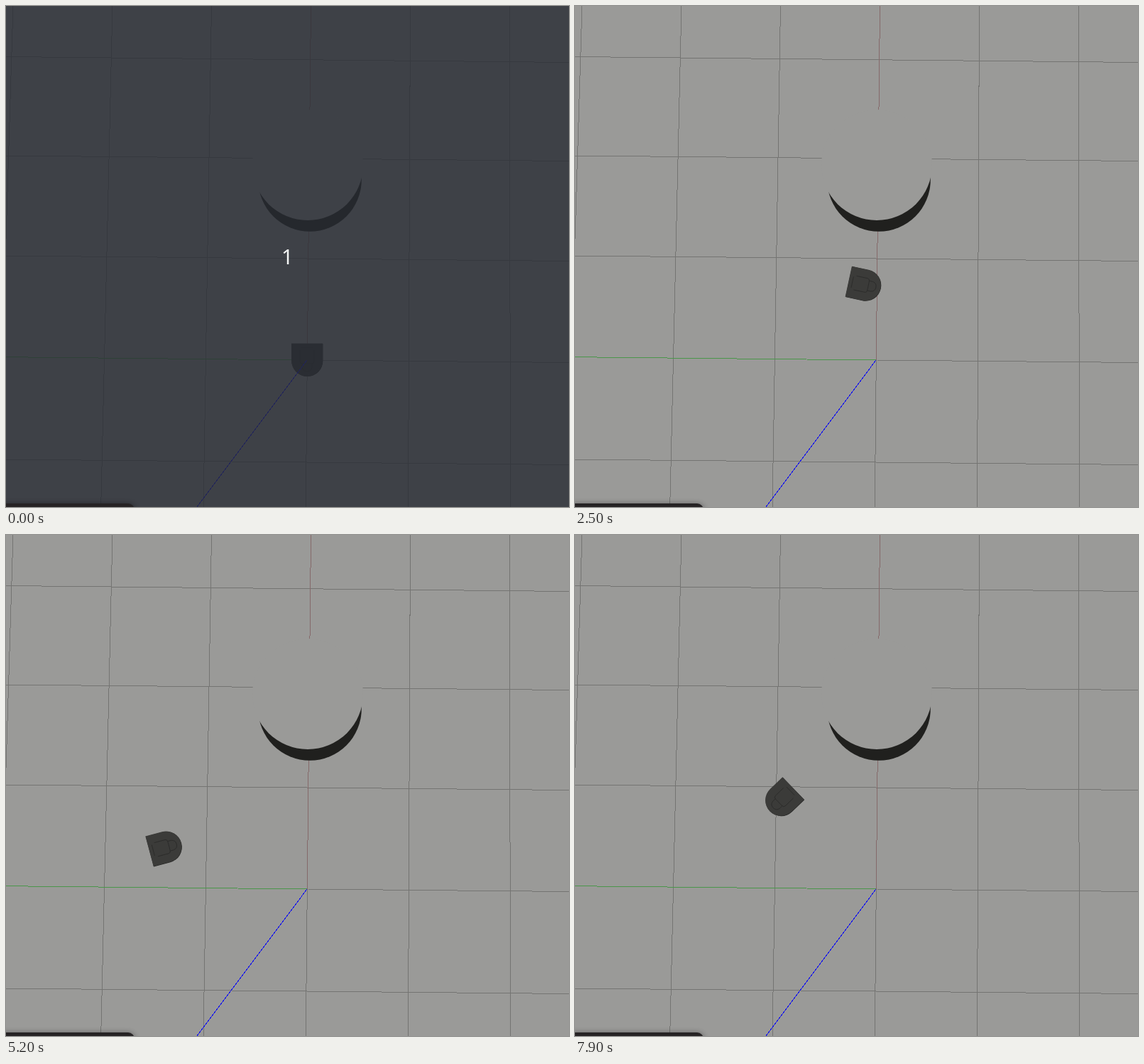
These frames come from a looping animation (793 px wide and 706 px high, 8000 ms). An HTML page:

```html
<!DOCTYPE html>
<html lang="en">
<head>
<meta charset="utf-8">
<title>Robot drive</title>
<style>
  html, body { margin: 0; width: 100%; height: 100%; overflow: hidden; background: #9a9a98; }
  svg { display: block; width: 793px; height: 706px; }
  .lines { fill: none; stroke: #747472; stroke-width: 1; shape-rendering: crispEdges; }
  .red { stroke: #85696a; }
  .green { stroke: #4a964a; }
  .blue { stroke: #1010ee; }
  .detail { fill: none; stroke: #2a2a29; stroke-width: .8; }
  .count { font: 29px "Noto Sans", "Open Sans", sans-serif; fill: #f4f6f6; }
</style>
</head>
<body>
<svg viewBox="0 0 793 706">
  <defs>
    <path id="hull" d="M-22-23.5H22V.7A22 22 0 0 1-22 .7Z"/>
    <filter id="blur" x="-20%" y="-200%" width="140%" height="500%">
      <feGaussianBlur stdDeviation="4.5"/>
    </filter>
  </defs>
  <rect width="793" height="706" fill="#9a9a98"/>

  <g class="lines">
    <path d="M10 0L-11.5 706M150 0L133.7 706M289.5 0L278 706M424.3 499L422.3 706M569.5 0L566.5 706M709.4 0L710.4 706"/>
    <path d="M0 71.5L793 79.5M0 211L793 218.5M0 352L793 359.5M424 499L793 502.5M0 639L793 646.5"/>
    <path class="red" d="M429.5 0L424.3 499"/>
    <path class="green" d="M0 494.7L424 499"/>
  </g>

  <!-- cylinder: dark side, then the lit top that also hides the grid -->
  <circle cx="428" cy="245" r="72.8" fill="#20201e"/>
  <circle cx="425" cy="224" r="78" fill="#9a9a98"/>

  <g id="side" fill="#222221"><use href="#hull"/></g>
  <g id="robot">
    <use href="#hull" fill="#3b3b39"/>
    <path class="detail" d="M-8-18H8M-10-14V2Q-10 5-6 5H6Q10 5 10 2V-14M-7 5V10Q-6 16 0 16T7 10V5"/>
  </g>
  <path class="lines blue" d="M424 499L269 706"/>

  <g id="cover">
    <rect width="793" height="706" fill="rgb(39,42,50)" fill-opacity=".787"/>
    <text class="count" x="388" y="364">1</text>
  </g>

  <rect x="-20" y="702" width="201" height="30" rx="9" fill="#000" opacity=".45" filter="url(#blur)"/>
  <rect x="-20" y="701" width="201" height="30" rx="9" fill="#262324"/>
</svg>

<script>
  const LOOP = 8000, STEP = 100;

  // where each straight run or turn begins; heading in degrees, 0 = up
  const route = [
    { at: 4.6, x: 424, y: 499, turn: 0 },
    { at: 13, x: 425, y: 455, turn: 1 },
    { at: 21, x: 424.5, y: 410.5, turn: 0 },
    { at: 26.4, x: 400, y: 392.8, turn: -105 },
    { at: 54.2, x: 209.7, y: 443.7, turn: -105 },
    { at: 59, x: 180.7, y: 432.5, turn: -11.5 },
    { at: 65, x: 207, y: 411, turn: 105 },
    { at: 67.5, x: 224, y: 414.5, turn: 105 },
    { at: 70.5, x: 245.5, y: 411, turn: 46 },
    { at: 79, x: 290.6, y: 373.3, turn: 46 }
  ];

  const $ = id => document.getElementById(id);
  const robot = $('robot'), side = $('side'), cover = $('cover');

  // cubic Hermite curve from a to b with end slopes u and v
  const curve = (a, b, u, v, t) =>
    a + (b - a) * t * t * (3 - 2 * t) + u * t * (1 - t) ** 2 - v * t * t * (1 - t);

  // the robot always drives the way it faces
  function poseAt(step) {
    const i = Math.max(1, route.findIndex(p => p.at >= step));
    const a = route[i - 1], b = route[i];
    const t = Math.max(0, (step - a.at) / (b.at - a.at));
    const reach = Math.hypot(b.x - a.x, b.y - a.y);
    const [p, q] = [a.turn, b.turn].map(deg => deg * Math.PI / 180);
    return {
      x: curve(a.x, b.x, reach * Math.sin(p), reach * Math.sin(q), t),
      y: curve(a.y, b.y, -reach * Math.cos(p), -reach * Math.cos(q), t),
      turn: a.turn + (b.turn - a.turn) * t
    };
  }

  function place(el, { x, y, turn }, shift) {
    el.setAttribute('transform', `translate(${x + shift} ${y + shift}) rotate(${turn})`);
  }

  function draw(time) {
    const step = Math.floor(time % LOOP / STEP);
    const pose = poseAt(step);
    place(robot, pose, 0);
    place(side, pose, .4);
    cover.style.display = step === 0 ? '' : 'none';
  }

  const start = performance.now();
  function tick() {
    draw(performance.now() - start);
    requestAnimationFrame(tick);
  }
  tick();
</script>
</body>
</html>
```
